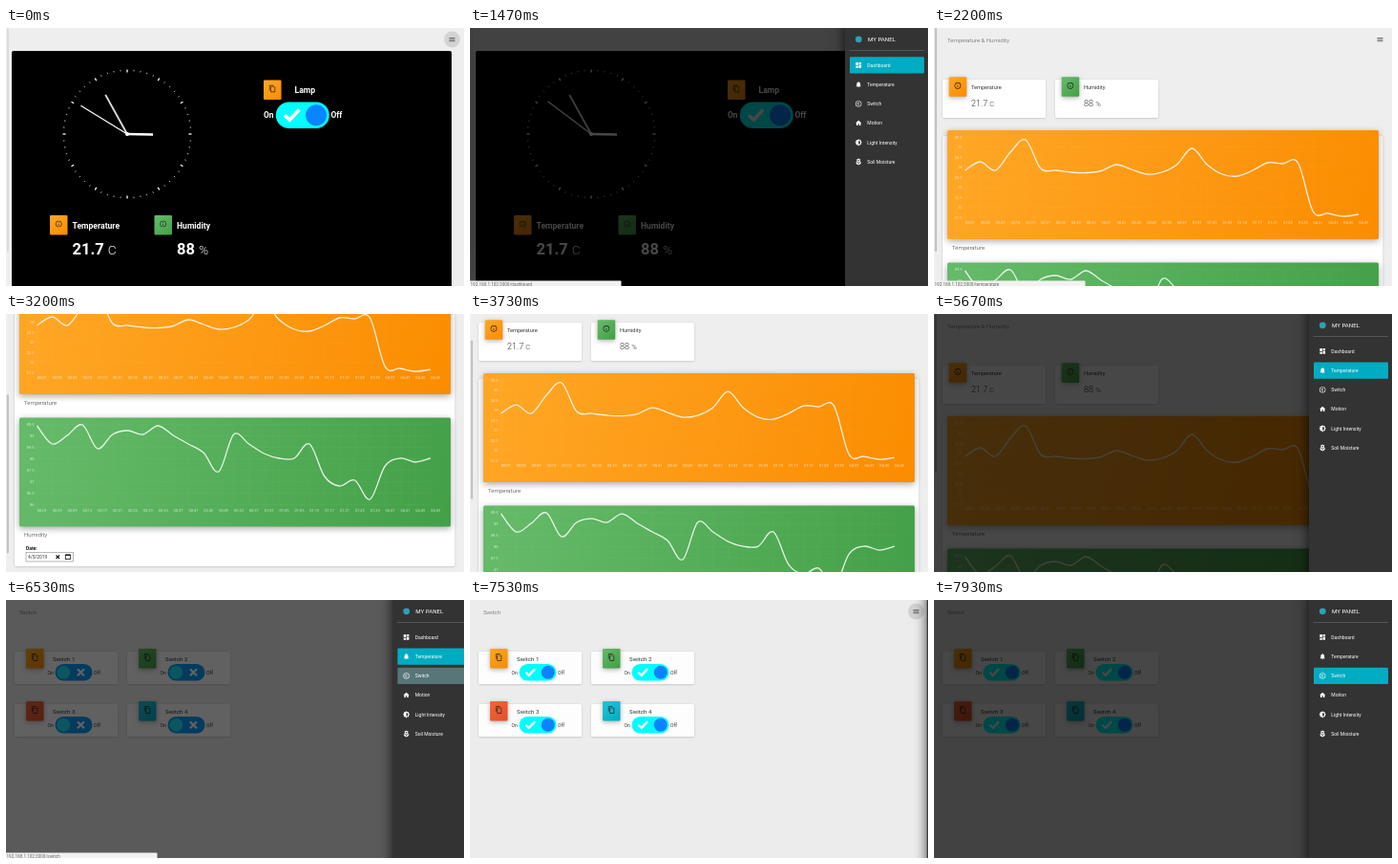
An HTML page with a canvas for the animation above (8 s loop, 480 by 270 pixels).

```html
<!DOCTYPE html>
<html lang="en">
<head>
<meta charset="utf-8">
<title>Home board</title>
<style>
html, body { margin: 0; width: 100%; height: 100%; overflow: hidden; background: #eee; }
canvas { display: block; width: 480px; height: 270px; }
</style>
</head>
<body>
<canvas id="stage" width="480" height="270"></canvas>
<script>
const g = document.getElementById('stage').getContext('2d');
const W = 480, H = 270, LOOP = 8000, TAU = Math.PI * 2;
const DRAWER_W = 87, DIM = 0.72;
const ORANGE = ['#ffa726', '#fb8c00'], GREEN = ['#66bb6a', '#43a047'];
const RED = ['#f4683a', '#e5502a'], TEAL = ['#26c6da', '#00acc1'];

const RING = 'M12 2a10 10 0 1 0 0 20a10 10 0 1 0 0-20zm0 2a8 8 0 1 1 0 16a8 8 0 1 1 0-16z';
const ICONS = {
  info: RING + 'M11 7h2v2h-2zM11 11h2v6h-2z',
  copy: 'M16 1H4c-1.1 0-2 .9-2 2v14h2V3h12zM19 5H8c-1.1 0-2 .9-2 2v14c0 1.1.9 2 2 2h11c1.1 0 2-.9 2-2V7c0-1.1-.9-2-2-2zm0 16H8V7h11z',
  dash: 'M3 13h8V3H3zm0 8h8v-6H3zm10 0h8V11h-8zm0-18v6h8V3z',
  bell: 'M12 22c1.1 0 2-.9 2-2h-4c0 1.1.9 2 2 2zm6-6v-5c0-3.1-1.6-5.6-4.5-6.3V4a1.5 1.5 0 0 0-3 0v.7C7.6 5.4 6 7.9 6 11v5l-2 2v1h16v-1z',
  copyright: RING + 'M15.5 9.5a4.3 4.3 0 1 0 0 5l-1.6-1.1a2.4 2.4 0 1 1 0-2.8z',
  home: 'M10 20v-6h4v6h5v-8h3L12 3 2 12h3v8z',
  light: 'M20 15.3L23.3 12 20 8.7V4h-4.7L12 .7 8.7 4H4v4.7L.7 12 4 15.3V20h4.7l3.3 3.3 3.3-3.3H20zM12 18V6a6 6 0 0 1 0 12z',
  flower: 'M12 22c5 0 9-4 9-9-5 0-9 4-9 9zM3 13c0 5 4 9 9 9 0-5-4-9-9-9zM12 1l3 2.3 3.6.6L17 8l1.6 4-3.6.7L12 15l-3-2.3-3.6-.7L7 8 5.4 3.9 9 3.3zm0 4.5a2.5 2.5 0 1 0 0 5a2.5 2.5 0 1 0 0-5z'
};
for (const k in ICONS) ICONS[k] = new Path2D(ICONS[k]);

const MENU = [['Dashboard', 'dash'], ['Temperature', 'bell'], ['Switch', 'copyright'],
  ['Motion', 'home'], ['Light Intensity', 'light'], ['Soil Moisture', 'flower']];

const TEMPS = [149, 140, 149, 130, 117, 147, 149, 151, 151.5, 149.5, 143, 148, 153, 151,
  143, 126, 143, 153, 155, 149, 141, 142, 141, 192, 194, 197, 195];
const HUMID = [117, 136, 127, 116, 141, 126, 122, 126, 117, 127, 136, 145, 165, 126,
  136, 146, 151, 151, 136, 170, 180, 174, 194, 159, 151, 155, 151];

const clamp = v => Math.max(0, Math.min(1, v));
const ramp = (t, from, len) => clamp((t - from) / len);
const easeOut = p => 1 - Math.pow(1 - p, 3);
const smooth = p => p * p * (3 - 2 * p);

function text(s, x, y, size, color, weight = 400, align = 'left') {
  g.font = `${weight} ${size}px Roboto, sans-serif`;
  g.fillStyle = color;
  g.textAlign = align;
  g.fillText(s, x, y);
}

function box(x, y, w, h, r, fill) {
  g.beginPath();
  g.roundRect(x, y, w, h, r);
  g.fillStyle = fill;
  g.fill();
}

function disc(x, y, r, fill) {
  g.beginPath();
  g.arc(x, y, r, 0, TAU);
  g.fillStyle = fill;
  g.fill();
}

function line(x1, y1, x2, y2, width, color) {
  g.beginPath();
  g.moveTo(x1, y1);
  g.lineTo(x2, y2);
  g.lineWidth = width;
  g.strokeStyle = color;
  g.stroke();
}

function withShadow(blur, dy, color, draw) {
  g.save();
  g.shadowBlur = blur;
  g.shadowOffsetY = dy;
  g.shadowColor = color;
  draw();
  g.restore();
}

function icon(name, cx, cy, size, color) {
  g.save();
  g.translate(cx - size / 2, cy - size / 2);
  g.scale(size / 24, size / 24);
  g.fillStyle = color;
  g.fill(ICONS[name], 'evenodd');
  g.restore();
}

function blend(x, y, w, h, [a, b]) {
  const f = g.createLinearGradient(x, y, x + w, y + h);
  f.addColorStop(0, a);
  f.addColorStop(1, b);
  return f;
}

function badge(x, y, colors, name) {
  withShadow(5, 1.5, 'rgba(0,0,0,.3)', () => box(x, y, 18.5, 20.5, 1, blend(x, y, 18, 20, colors)));
  icon(name, x + 9.2, y + 9, 8, '#222');
}

const card = (x, y, w, h) =>
  withShadow(2, 0.5, 'rgba(0,0,0,.22)', () => box(x, y, w, h, 1.5, '#fff'));

// p: 0 = knob left with a cross, 1 = knob right with a tick
function toggle(x, y, w, h, p) {
  const r = h / 2, cy = y + r, on = p > 0.5;
  box(x, y, w, h, r, on ? '#0ff' : '#0a9bfa');
  disc(x + r + (w - h) * p, cy, r * 0.8, on ? '#0a84ff' : '#1fe4fb');
  g.beginPath();
  if (on) {
    const cx = x + w * 0.29;
    g.moveTo(cx - r * 0.5, cy);
    g.lineTo(cx - r * 0.12, cy + r * 0.35);
    g.lineTo(cx + r * 0.6, cy - r * 0.42);
  } else {
    const cx = x + w * 0.69, d = r * 0.4;
    g.moveTo(cx - d, cy - d);
    g.lineTo(cx + d, cy + d);
    g.moveTo(cx + d, cy - d);
    g.lineTo(cx - d, cy + d);
  }
  g.lineWidth = r * 0.27;
  g.strokeStyle = '#fff';
  g.stroke();
}

function header(title, hover) {
  text(title, 14, 14.8, 6.1, '#555', 300);
  if (hover > 0) disc(467.5, 12, 8.4, `rgba(150,150,150,${0.3 * hover})`);
  for (let i = -1; i < 2; i++) box(464.5, 11.7 + i * 1.7, 6, 0.8, 0, '#555');
}

const scrollbar = (y, h, alpha) => box(0.8, y, 2.2, h, 1, `rgba(150,150,150,${alpha})`);

function clock(cx, cy, t) {
  for (let i = 0; i < 60; i++) {
    const a = i / 60 * TAU, major = i % 5 === 0, r = major ? 64.5 : 66;
    line(cx + Math.sin(a) * r, cy - Math.cos(a) * r, cx + Math.sin(a) * 67.5, cy - Math.cos(a) * 67.5,
      major ? 1.3 : 1, major ? '#fff' : '#bbb');
  }
  const hand = (deg, len, width, color) => {
    const a = deg / 360 * TAU;
    line(cx, cy, cx + Math.sin(a) * len, cy - Math.cos(a) * len, width, color);
  };
  hand(91, 27, 2.4, '#fff');
  hand(331, 47, 1.9, '#ddd');
  hand(t < 200 ? 301.5 : 307, 57, 1.2, '#fff');
  disc(cx, cy, 2, '#fff');
}

function reading(x, y, value, unit, size, color, weight) {
  text(value, x, y, size, color, weight);
  const w = g.measureText(value + ' ').width;
  text(unit, x + w, y, size * 0.83, color, 300);
}

function dashboard(t) {
  header('', 1);
  scrollbar(0, 234, 0.2);
  box(6, 24, 461, 260, 2, '#000');
  clock(127, 111, t);
  [[46, ORANGE, 'Temperature', '21.7', 'C'], [155.5, GREEN, 'Humidity', '88', '%']]
    .forEach(([x, colors, label, value, unit]) => {
      badge(x, 196, colors, 'info');
      text(label, x + 23.5, 209.5, 8.6, '#fff', 700);
      reading(x + 23.5, 237, value, unit, 16.5, '#fff', 700);
    });
  badge(270, 54.5, ORANGE, 'copy');
  text('Lamp', 302.5, 68, 8.6, '#fff', 700);
  text('On', 270, 94, 8.4, '#fff', 700);
  text('Off', 340.5, 94, 8.4, '#fff', 700);
  toggle(282.8, 77.5, 56, 27.5, 1);
}

function stamp(i) {
  const m = i < 23 ? 1 + i * 4 : 277 + (i - 23) * 4;
  return [Math.floor(m / 60), m % 60].map(v => String(v).padStart(2, '0')).join(':');
}

function chart(y, colors, values, top, rows) {
  withShadow(7, 2, 'rgba(0,0,0,.35)', () => box(14, y, 452, 114, 1.5, blend(14, y, 452, 114, colors)));
  const px = i => 32.5 + i * 15.86, py = i => y - 107 + values[i], last = values.length - 1;
  const step = 84 / (rows - 1);
  for (let i = 0; i < rows; i++) {
    const ly = y + 7 + i * step;
    line(32.5, ly, 445, ly, 0.4, 'rgba(255,255,255,.08)');
    text(String(top - i * 0.5), 29.5, ly + 1.5, 4, 'rgba(255,255,255,.7)', 400, 'right');
  }
  for (let i = 0; i <= last; i++) {
    line(px(i), y + 7, px(i), y + 91, 0.4, 'rgba(255,255,255,.08)');
    text(stamp(i), px(i) + 5.3, y + 98, 4, 'rgba(255,255,255,.7)', 400, 'center');
  }
  g.beginPath();
  g.moveTo(px(0), py(0));
  for (let i = 0; i < last; i++) {
    const a = Math.max(0, i - 1), b = Math.min(last, i + 2);
    g.bezierCurveTo(px(i) + (px(i + 1) - px(a)) / 6, py(i) + (py(i + 1) - py(a)) / 6,
      px(i + 1) - (px(b) - px(i)) / 6, py(i + 1) - (py(b) - py(i)) / 6, px(i + 1), py(i + 1));
  }
  g.lineWidth = 1.3;
  g.strokeStyle = 'rgba(255,255,255,.85)';
  g.stroke();
}

function temperature(t) {
  const scroll = 137 * (smooth(ramp(t, 2330, 830)) - smooth(ramp(t, 3250, 780)));
  g.save();
  g.translate(0, -scroll);
  header('Temperature & Humidity', ramp(t, 4350, 150));
  [[9, ORANGE, 'Temperature', '21.7', 'C'], [127, GREEN, 'Humidity', '88', '%']]
    .forEach(([x, colors, label, value, unit]) => {
      card(x, 54, 108, 40);
      badge(x + 6.7, 51.3, colors, 'info');
      text(label, x + 30, 64, 5.6, '#333');
      reading(x + 30, 82, value, unit, 9, '#333', 300);
    });
  card(9, 113, 461.5, 288);
  chart(107, ORANGE, TEMPS, 25.5, 9);
  text('Temperature', 19, 231.5, 6.1, '#333', 300);
  chart(245.5, GREEN, HUMID.map(v => v - 1.5), 89.5, 8);
  text('Humidity', 19, 369.8, 6.1, '#333', 300);
  text('Date:', 21, 384, 5, '#111', 700);
  g.lineWidth = 0.6;
  g.strokeStyle = '#888';
  g.strokeRect(21, 386.5, 49.5, 9.5);
  text('4/5/2019', 23, 393.2, 4.8, '#333');
  line(52.5, 389.5, 56, 393, 1.1, '#111');
  line(56, 389.5, 52.5, 393, 1.1, '#111');
  g.lineWidth = 0.8;
  g.strokeStyle = '#111';
  g.strokeRect(62.3, 389, 5, 4.6);
  line(62, 389.3, 67.6, 389.3, 1.2, '#111');
  g.restore();
  if (t < 2330) scrollbar(0, 234, 0.5);
  else scrollbar(scroll * 166 / 270, 166, 0.5);
}

function switches(t) {
  header('Switch', ramp(t, 7150, 120));
  const p = smooth(ramp(t, 6800, 200));
  [ORANGE, GREEN, RED, TEAL].forEach((colors, i) => {
    const x = 9 + (i % 2) * 118, y = 54 + (i >> 1) * 55;
    card(x, y, 108, 34);
    badge(x + 12, y - 3, colors, 'copy');
    text('Switch ' + (i + 1), x + 40, y + 10, 6.2, '#333');
    text('On', x + 34.5, y + 23.5, 5, '#333');
    text('Off', x + 83, y + 23.5, 5, '#333');
    toggle(x + 42.5, y + 13, 39, 17.5, p);
  });
}

function drawer(open, active, hover) {
  if (open <= 0) return;
  g.fillStyle = `rgba(0,0,0,${DIM * open})`;
  g.fillRect(0, 0, W, H);
  g.save();
  g.translate(W - DRAWER_W * open, 0);
  withShadow(12, 2, 'rgba(0,0,0,.75)', () => box(0, -10, DRAWER_W + 20, H + 20, 0, '#333'));
  disc(14.3, 11.8, 3.4, '#2f9fb8');
  text('MY PANEL', 24, 14.1, 6.1, '#fff');
  line(4.5, 23.5, 83, 23.5, 0.5, '#777');
  MENU.forEach(([label, name], i) => {
    const y = 38.8 + i * 20.25;
    if (i === active) box(5, y - 8.6, 78, 17.4, 1.2, '#00acc1');
    else if (i === hover) box(5, y - 8.6, 78, 17.4, 1.2, 'rgba(130,200,205,.45)');
    icon(name, 14.2, y, 7.6, '#fff');
    text(label, 23.3, y + 1.8, 5, '#fff');
  });
  g.restore();
}

function status(path) {
  box(-2, 264.5, 160.5, 8, 1, '#f1f1f1');
  text('192.168.1.102:3000/' + path, 0.5, 269.7, 4.6, '#666');
}

// [opens, starts closing, active item, hovered from, hovered item]
const VISITS = [[600, 1800, 0, 1600, 1], [4880, 6480, 1, 6050, 2], [7530, 9000, 2, 9000, 2]];

function draw(t) {
  g.fillStyle = '#eee';
  g.fillRect(0, 0, W, H);
  if (t < 1790) dashboard(t);
  else if (t < 6300) temperature(t);
  else switches(t);

  for (const [from, to, active, hoverAt, item] of VISITS) {
    const open = easeOut(ramp(t, from, 225)) * (1 - smooth(ramp(t, to, 215)));
    if (t >= from) drawer(open, active, t >= hoverAt ? item : -1);
  }
  if (t > 1250 && t < 1600) status('dashboard');
  else if (t >= 1600 && t < 2330) status('temperature');
  else if (t > 6050 && t < 6750) status('switch');
}

function tick(now) {
  draw(now % LOOP);
  requestAnimationFrame(tick);
}
draw(0);
requestAnimationFrame(tick);
</script>
</body>
</html>
```
